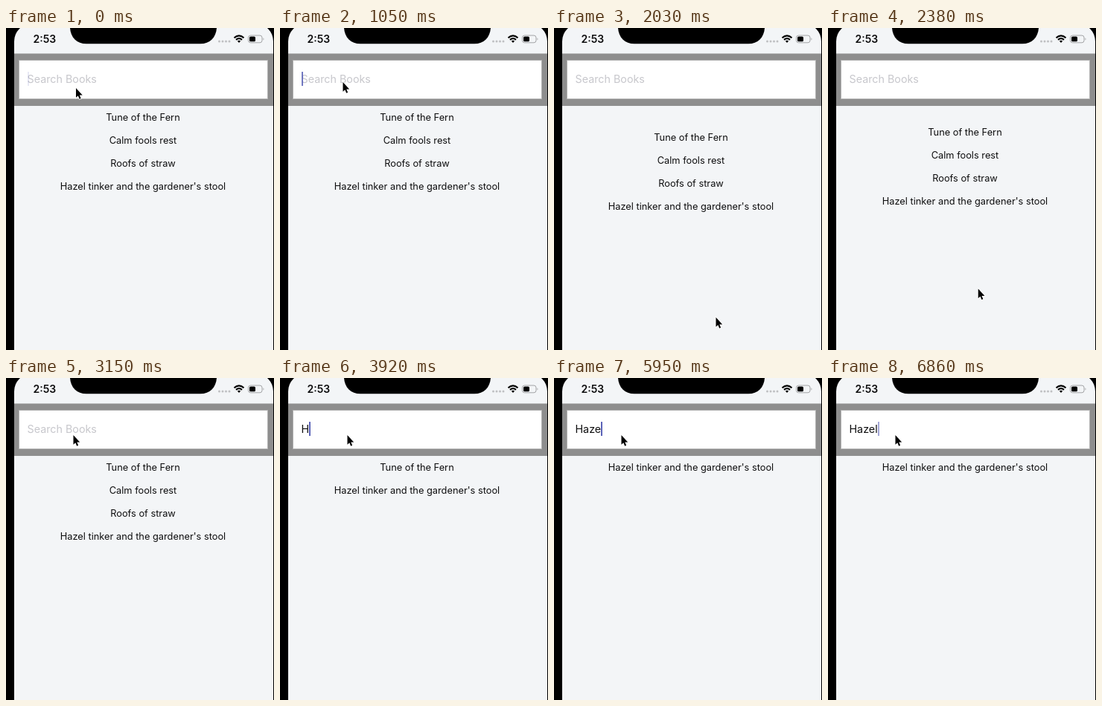
These frames come from a looping animation (360x434 px, 6930 ms). An HTML page:

```html
<!DOCTYPE html>
<html lang="en">
<head>
<meta charset="utf-8">
<title>Book search</title>
<style>
  html, body { margin: 0; width: 100%; height: 100%; overflow: hidden; background: #000; }
  .stage { position: relative; width: 360px; height: 434px; overflow: hidden; background: #000;
    font-family: Inter, "Liberation Sans", sans-serif; color: #0e0e0f; }
  .stage > *, .field > * { position: absolute; }
  .screen { left: 11px; top: -6px; width: 348px; height: 460px; border-radius: 24px 24px 0 0; background: #f3f5f7; }
  .list { left: 11px; top: 105px; width: 346px; text-align: center; font-size: 12.8px; line-height: 31px; white-space: nowrap; }
  .bar { left: 11px; top: 34px; width: 348px; height: 71px; box-sizing: border-box;
    border-top: 1px solid #bcbdbe; background: #8e8e8e; }
  .field { left: 17px; top: 43px; width: 335px; height: 53px; box-sizing: border-box;
    border: 1px solid #b4b4b4; background: #fff; font-size: 14.3px; line-height: 50px; white-space: pre; }
  .hint, .entry { left: 10.5px; top: 0; }
  .hint { color: #c7c7cc; }
  .caret { position: absolute; left: 100%; top: 15px; width: 2px; height: 19px; background: #5b63b8; }
  .clock { left: 36.5px; top: 5px; font-size: 14px; font-weight: 600; line-height: 20px; }
  svg { left: 0; top: 0; overflow: visible; }
</style>
</head>
<body>
<div class="stage">
  <div class="screen"></div>
  <div class="list"></div>
  <div class="bar"></div>
  <div class="field">
    <span class="hint">Search Books</span>
    <span class="entry"><span class="typed"></span><i class="caret"></i></span>
  </div>
  <div class="clock">2:53</div>
  <svg width="360" height="35">
    <path d="M86 0C87 13 95 21.3 108 21.3H261C274 21.3 282 13 283 0Z"/>
    <g fill="#bfc0c2">
      <circle cx="286.5" cy="18" r="1.5"/><circle cx="291" cy="18" r="1.5"/>
      <circle cx="295.5" cy="18" r="1.5"/><circle cx="300" cy="18" r="1.5"/>
    </g>
    <g fill="none" stroke="#000" stroke-width="2.1">
      <path d="M306.5 13.2Q313 7.4 319.5 13.2M309 15.9Q313 12.4 317 15.9"/>
    </g>
    <path d="M310.8 17.6Q313 15.8 315.2 17.6L313 19.9Z"/>
    <rect x="325.5" y="10" width="18.5" height="9.8" rx="3" fill="none" stroke="#a2a3a5"/>
    <rect x="327" y="11.5" width="8" height="6.8" rx="1.6"/>
    <path d="M345.5 13.2Q347.4 14.9 345.5 16.6Z" fill="#a2a3a5"/>
  </svg>
  <svg class="mouse" width="10" height="16">
    <path d="M0 0V12.8L2.8 10.2L4.7 14.7L6.6 13.8L4.8 9.4H8.7Z" stroke="#fff" stroke-width="1.6" paint-order="stroke"/>
  </svg>
</div>
<script>
  const LOOP = 6930, TICK = 70;
  const books = [
    "Tune of the Fern",
    "Calm fools rest",
    "Roofs of straw",
    "Hazel tinker and the gardener's stool"
  ];
  const word = "Hazel";
  const keyTimes = [3850, 4480, 5250, 5600, 6230];
  const blurAt = 1680, focusAt = 3430;

  // [time, x, y]
  const mousePath = [
    [0, 94, 81], [350, 94, 81], [980, 84.5, 73], [1050, 84.5, 73], [1260, 128, 180],
    [1400, 130, 184], [1750, 206, 335], [2030, 217.5, 390], [2240, 217.5, 390],
    [2730, 138, 196], [3080, 90.5, 77]
  ];
  // [time, offset]
  const pullPath = [[1750, 0], [2030, 27], [2240, 27], [2660, 0]];

  const $ = s => document.querySelector(s);
  const list = $(".list"), hint = $(".hint"), typed = $(".typed"), caret = $(".caret"), mouse = $(".mouse");
  const clamp = v => Math.min(1, Math.max(0, v));
  const ease = p => p * p * (3 - 2 * p);

  function along(path, t) {
    const next = path.findIndex(k => k[0] > t);
    if (next < 0) return path[path.length - 1].slice(1);
    if (next === 0) return path[0].slice(1);
    const a = path[next - 1], b = path[next];
    const p = ease((t - a[0]) / (b[0] - a[0]));
    return a.slice(1).map((v, i) => v + (b[i + 1] - v) * p);
  }

  function caretAlpha(t) {
    if (t >= blurAt && t < focusAt) return 0;
    const lastKey = keyTimes.filter(k => k <= t).pop();
    const start = lastKey ?? (t >= focusAt ? focusAt : -10);
    const phase = (t - start) % 1000;
    const rise = lastKey ? 1 : clamp(phase / 70);
    return rise * clamp((720 - phase) / 160);
  }

  let shown = null;
  function showQuery(query) {
    if (query === shown) return;
    shown = query;
    typed.textContent = query;
    hint.style.display = query ? "none" : "";
    list.replaceChildren(...books
      .filter(b => b.toLowerCase().includes(query.toLowerCase()))
      .map(b => Object.assign(document.createElement("div"), { textContent: b })));
  }

  function draw(now) {
    const t = Math.floor((now % LOOP) / TICK) * TICK;
    showQuery(word.slice(0, keyTimes.filter(k => k <= t).length));
    caret.style.opacity = caretAlpha(t);
    const [x, y] = along(mousePath, t);
    mouse.style.transform = `translate(${x}px, ${y}px)`;
    list.style.transform = `translateY(${along(pullPath, t)[0]}px)`;
  }

  const begin = performance.now();
  function loop() {
    draw(performance.now() - begin);
    requestAnimationFrame(loop);
  }
  loop();
</script>
</body>
</html>
```
